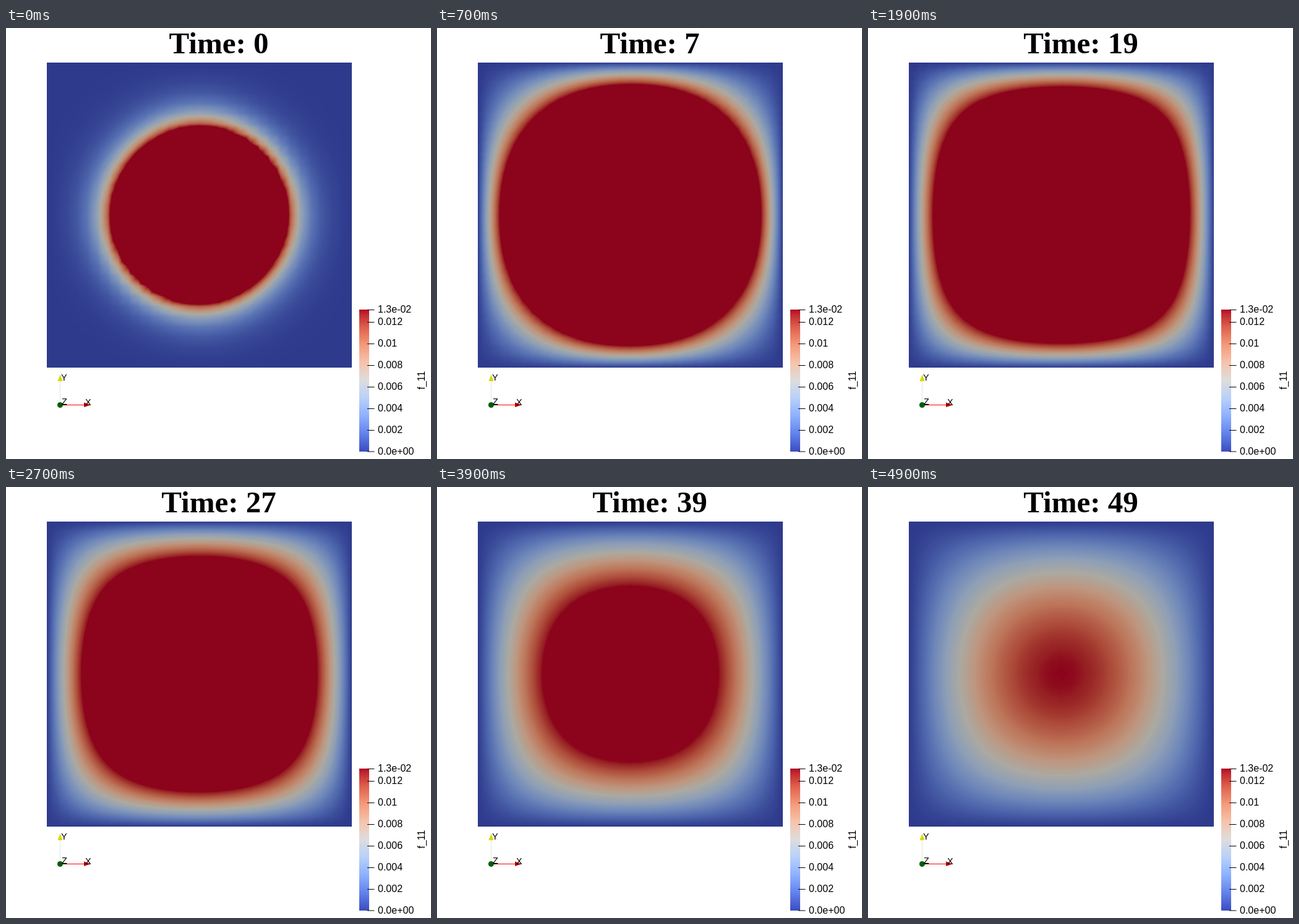
These frames come from a looping animation (687 px wide and 698 px high, 5000 ms). An HTML page with a canvas:

```html
<!DOCTYPE html>
<html>
<head>
<meta charset="utf-8">
<style>
html, body { margin: 0; width: 100%; height: 100%; overflow: hidden; background: #fff; }
canvas, svg { position: absolute; left: 0; top: 0; }
canvas { left: 66px; top: 56px; }
text { font: 16px "Liberation Sans", Arial, sans-serif; }
#title { font: bold 49px "Liberation Serif", "Times New Roman", serif; }
.axis text { font-size: 14.5px; }
</style>
</head>
<body>
<canvas id="field" width="493" height="494"></canvas>
<svg width="687" height="698" viewBox="0 0 687 698">
  <defs><linearGradient id="ramp" x1="0" y1="1" x2="0" y2="0"></linearGradient></defs>
  <text id="title" x="344" y="41" text-anchor="middle">Time: 0</text>
  <g class="axis">
    <path d="M87.5 572V606" stroke="#dcebdc"/>
    <path d="M87 610.5H98" stroke="#300"/>
    <path d="M98 610.5H128" stroke="#f00"/>
    <path d="M126 606.5L137 610.5L126 614Z" fill="#b80000"/>
    <path d="M87.5 561.5L91.5 572H83.5Z" fill="#d8d800"/>
    <circle cx="87.5" cy="610.5" r="4.5" fill="#005f00"/>
    <text x="89" y="571">Y</text>
    <text x="90" y="610">Z</text>
    <text x="128" y="611">X</text>
  </g>
  <rect x="571" y="456" width="16" height="230" fill="url(#ramp)"/>
  <g id="ticks"></g>
  <text transform="translate(677 585.5) rotate(-90)">f_11</text>
</svg>
<script>
const $ = id => document.getElementById(id);

// Cool-to-warm colour map: position, r, g, b
const STOPS = [
  [0, 59, 76, 192], [.125, 98, 130, 234], [.25, 141, 176, 254],
  [.375, 184, 208, 249], [.5, 221, 221, 221], [.625, 245, 196, 173],
  [.75, 244, 154, 123], [.875, 222, 96, 77], [.969, 192, 40, 47], [1, 180, 4, 38]
];
const LIGHT = [.775, .765, .73];   // shading of the lit surface

function mapColor(v) {
  let k = 1;
  while (k < STOPS.length - 1 && v > STOPS[k][0]) k++;
  const a = STOPS[k - 1], b = STOPS[k], f = (v - a[0]) / (b[0] - a[0]);
  return [1, 2, 3].map(i => a[i] + f * (b[i] - a[i]));
}

const lut = Array.from({ length: 256 }, (_, i) =>
  mapColor(i / 255).map((c, k) => Math.round(c * LIGHT[k])));

$('ramp').innerHTML = STOPS.map(([p, ...c]) =>
  `<stop offset="${p}" stop-color="rgb(${c})"/>`).join('');

const tick = (y, label) => `<path d="M584 ${y}H595.5" stroke="#000"/>
  <text x="601" y="${y + 4.5}">${label}</text>`;
$('ticks').innerHTML = tick(456.5, '1.3e-02') + tick(686, '0.0e+00') +
  [.012, .01, .008, .006, .004, .002].map(v =>
    tick(Math.floor(686 - 230 * v / .01317) + .5, v)).join('');

// Diffusing Gaussian on [-2,2]^2, zero border: linear elements, implicit Euler
const N = 30, S = N + 1, STEPS = 50, DT = 2 / STEPS, H = 4 / N;
const M0 = H * H / 2, M1 = H * H / 12;
const sides = (u, p) => u[p - 1] + u[p + 1] + u[p - S] + u[p + S];
const diagonals = (u, p) => u[p - S - 1] + u[p + S + 1];

function inner(fn) {
  for (let j = 1; j < N; j++) for (let i = 1; i < N; i++) fn(j * S + i, i, j);
}

function advance(old) {
  const u = old.slice(), rhs = new Float64Array(S * S);
  inner(p => { rhs[p] = M0 * old[p] + M1 * (sides(old, p) + diagonals(old, p)); });
  for (let k = 0; k < 100; k++)
    inner(p => {
      u[p] = (rhs[p] + (DT - M1) * sides(u, p) - M1 * diagonals(u, p)) / (M0 + 4 * DT);
    });
  return u;
}

let u = new Float64Array(S * S);
inner((p, i, j) => { u[p] = Math.exp(-5 * ((i * H - 2) ** 2 + (j * H - 2) ** 2)); });
const states = [];
for (let n = 0; n < STEPS; n++) states.push(u = advance(u));
const top1 = u[(S * S - 1) / 2];   // colour scale ends at the last peak

const canvas = $('field'), ctx = canvas.getContext('2d');
const W = canvas.width, HT = canvas.height, img = ctx.createImageData(W, HT);

function draw(n) {
  const u = states[n], d = img.data;
  for (let y = 0, q = 0; y < HT; y++) {
    const gy = (HT - y - .5) / HT * N, j = Math.floor(gy), fy = gy - j;
    for (let x = 0; x < W; x++, q += 4) {
      const gx = (x + .5) / W * N, i = Math.floor(gx), fx = gx - i;
      const p = j * S + i, a = u[p], b = u[p + S + 1];
      const c = fx > fy ? u[p + 1] : u[p + S];
      const v = fx > fy ? a + fx * (c - a) + fy * (b - c) : a + fy * (c - a) + fx * (b - c);
      const rgb = lut[Math.max(0, Math.min(255, Math.floor(v / top1 * 256)))];
      d[q] = rgb[0]; d[q + 1] = rgb[1]; d[q + 2] = rgb[2]; d[q + 3] = 255;
    }
  }
  ctx.putImageData(img, 0, 0);
  $('title').textContent = 'Time: ' + n;
}

let shown = -1;
const start = performance.now();
function loop() {
  const n = Math.floor((performance.now() - start) / 100) % STEPS;
  if (n !== shown) draw(shown = n);
  requestAnimationFrame(loop);
}
loop();
</script>
</body>
</html>
```
